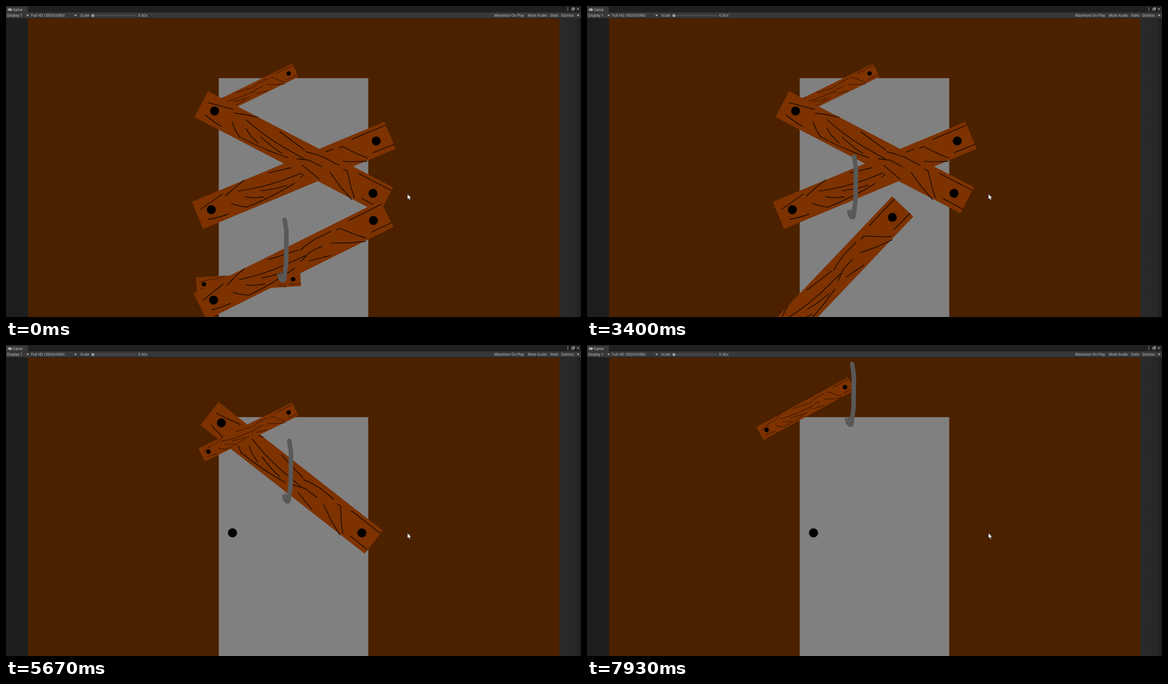
An HTML page for the animation above (8 s loop, 1017 px wide and 551 px high).

```html
<!DOCTYPE html>
<html lang="en">
<head>
<meta charset="utf-8">
<title>Planks</title>
<style>
html, body { margin: 0; width: 100%; height: 100%; overflow: hidden; background: #282828; }
svg { display: block; width: 1017px; height: 551px; }
text { font: 6.3px Inter, "Open Sans", sans-serif; fill: #c4c4c4; }
</style>
</head>
<body>
<svg viewBox="0 0 1017 551">
  <defs>
    <linearGradient id="edge">
      <stop offset="0" stop-color="#1d1d1d"/>
      <stop offset=".25" stop-color="#282828"/>
      <stop offset="1" stop-color="#2a2a2a"/>
    </linearGradient>
    <g id="plank">
      <rect x="-184.5" y="-26" width="369" height="52" fill="#7d3200"/>
      <path id="grain" fill="none" stroke="#1c0b00" stroke-width="1.4" stroke-linecap="round" stroke-linejoin="round"/>
      <g fill="#000" stroke="#1f0d00">
        <circle cx="-158" r="7.6"/>
        <circle cx="158" r="7.6"/>
      </g>
    </g>
  </defs>

  <rect width="1017" height="551" fill="url(#edge)"/>
  <rect width="39" height="551" x="-1017" fill="url(#edge)" transform="scale(-1 1)"/>
  <rect x="39" y="22" width="940" height="529" fill="#4b2100"/>
  <rect x="376.3" y="127.8" width="264.4" height="424" fill="#808080"/>
  <circle cx="400.6" cy="332.8" r="7.9" stroke="#262626" stroke-width=".8"/>

  <g id="layer"></g>

  <g id="bar">
    <path d="M0 0L3 20L2.5 76L-1 104" fill="none" stroke="#595959" stroke-width="8" stroke-linecap="round" stroke-linejoin="round"/>
    <path d="M-13 96L-10.5 94L-5 102L-9 94L-6.5 92.5L-3 98L2 97L3 106L0 111L-6 111L-11 105Z" fill="#595959"/>
  </g>

  <rect width="1017" height="22" fill="#383838"/>
  <rect width="1017" height="11.3" fill="#202020"/>
  <rect y="1" width="38.5" height="10.5" fill="#383838"/>
  <rect y="21.3" width="1017" height=".9" fill="#232323"/>
  <rect x="3" y="4.6" width="7.4" height="4" rx="2" fill="#c4c4c4"/>
  <path d="M4.2 6.6h2M5.2 5.6v2M8 6.6h1" stroke="#383838" stroke-width=".7"/>

  <g id="labels"></g>

  <path d="M155 16.9H230" stroke="#626262" stroke-width="1"/>
  <circle cx="153.6" cy="16.9" r="2.6" fill="#999"/>
  <g fill="#c4c4c4">
    <path d="M36 15.6h4.6l-2.3 2.6zM120.8 15.6h4.6l-2.3 2.6zM1009.6 15.6h4.6l-2.3 2.6z"/>
    <circle cx="993.6" cy="3.2" r=".7"/>
    <circle cx="993.6" cy="5.5" r=".7"/>
    <circle cx="993.6" cy="7.8" r=".7"/>
  </g>
  <g fill="none" stroke="#c4c4c4" stroke-width=".9">
    <path d="M1000.8 4.6h3.4v3.2h-3.4zM1002 4.4V3h3.6v3.4h-1M1009.5 3.2l4.4 4.4M1013.9 3.2l-4.4 4.4"/>
  </g>
  <path d="M710 333v9.8l2.2-2 1.6 3.5 1.6-.7-1.5-3.4h3.1z" fill="#fff" stroke="#000" stroke-width=".6"/>
</svg>

<script>
const NS = "http://www.w3.org/2000/svg";
const STEP = 1000 / 15, LOOP = 8000, GRAVITY = 941;
const $ = id => document.getElementById(id);

const add = (parent, tag, attrs) => {
  const el = document.createElementNS(NS, tag);
  for (const k in attrs) el.setAttribute(k, attrs[k]);
  return parent.appendChild(el);
};

const labels = [
  [12, 9, "Game"], [2, 19.2, "Display 1"], [44.3, 19.2, "Full HD (1920x1080)"],
  [131, 19.2, "Scale"], [233.6, 19.2, "0.92x"], [863.6, 19.2, "Maximize On Play"],
  [923, 19.2, "Mute Audio"], [962, 19.2, "Stats"], [982, 19.2, "Gizmos"]
];
for (const [x, y, s] of labels) add($("labels"), "text", { x, y }).textContent = s;

$("grain").setAttribute("d", `
  M-175-8Q-152-13-130-18 M-169 14Q-151 18-134 18.6 M-125-13L-105-20L-84-26
  M-121 3Q-112 13-97 20.5 M-101-12Q-62-2-23 .5L22 2 M-94 2L-82 9L-64 15
  M-64 3Q-40 10-18 11.5 M-98 20Q-53 21-4 13.5 M-39-21Q-12-16 15-12.5
  M10.5 7.8L31 0L56 0 M24.5 13.5L62 21.6 M18.5-10.5Q34-15 50-16.5L82-16.3
  M73.5 2.2L101 16L129 27 M92-13.8L99-14L119 9L132 21.7
  M119.5-19.4L184-19.6 M145 17L184 17.6`);

// rest pose, launch time, launch velocity (px/s) and spin (deg/s)
const planks = {
  A: { x: 429, y: 154.3, a: -26.1, s: .5, at: 7785, vx: -283, vy: -351, spin: -17 },
  B: { x: 509, y: 300, a: -22.65, s: 1, at: 4246, vx: -118, vy: -437, spin: 147.5 },
  C: { x: 509, y: 259, a: 27.5, s: 1, at: 5600, vx: -57.4, vy: -386, spin: 159 },
  E: { x: 429, y: 488.5, a: -3.26, s: .5, at: 1580, vx: -60, vy: -246, spin: 155 },
  D: { x: 508.5, y: 450.5, a: -26.5, s: 1, at: 2686, vx: -108, vy: -282, spin: -28 }
};
for (const k in planks) planks[k].el = add($("layer"), "use", { href: "#plank" });

// plank, first step, step at rest again, size
const shakes = [["E", 5, 8, 1], ["E", 11, 18, 2], ["D", 29, 33, 4], ["B", 61, 62, 3], ["C", 80, 83, 4]];

// crowbar: time, x, y
const barPath = [
  [0, 493, 379], [270, 493, 379], [530, 456, 387], [3000, 456, 387],
  [3530, 478, 228], [3800, 494, 228], [4450, 494, 228], [5070, 501, 170],
  [5700, 501, 170], [6133, 483, 115], [6667, 469.5, 21], [6870, 469, 21],
  [7270, 469, 34], [8000, 469, 34]
];

function barAt(t) {
  const i = Math.max(1, barPath.findIndex(p => p[0] >= t));
  const [t0, x0, y0] = barPath[i - 1], [t1, x1, y1] = barPath[i];
  const f = (t - t0) / (t1 - t0);
  return [x0 + (x1 - x0) * f, y0 + (y1 - y0) * f];
}

function place(name, p, step, t) {
  const s = Math.max(0, t - p.at) / 1000;
  let x = p.x + p.vx * s;
  let y = p.y + p.vy * s + GRAVITY * s * s / 2;
  for (const [who, from, to, size] of shakes) {
    if (who !== name || step < from || step >= to) continue;
    const sign = step % 2 ? -1 : 1;
    x += sign * size;
    y -= sign * size * .3;
  }
  p.el.setAttribute("transform", `translate(${x} ${y}) rotate(${p.a + p.spin * s}) scale(${p.s})`);
}

let sunk = false;
function draw(ms) {
  const step = Math.floor(((ms + 4) % LOOP) / STEP), t = step * STEP;
  for (const k in planks) place(k, planks[k], step, t);
  $("bar").setAttribute("transform", `translate(${barAt(t).join(" ")})`);

  // the crossing plank drops behind the others once the one below it is loose
  if (sunk !== step >= 65) {
    sunk = !sunk;
    $("layer").insertBefore(planks.C.el, sunk ? planks.A.el : planks.E.el);
  }
}

const start = performance.now();
function tick(now) {
  draw(Math.max(0, now - start));
  requestAnimationFrame(tick);
}
draw(0);
requestAnimationFrame(tick);
</script>
</body>
</html>
```
